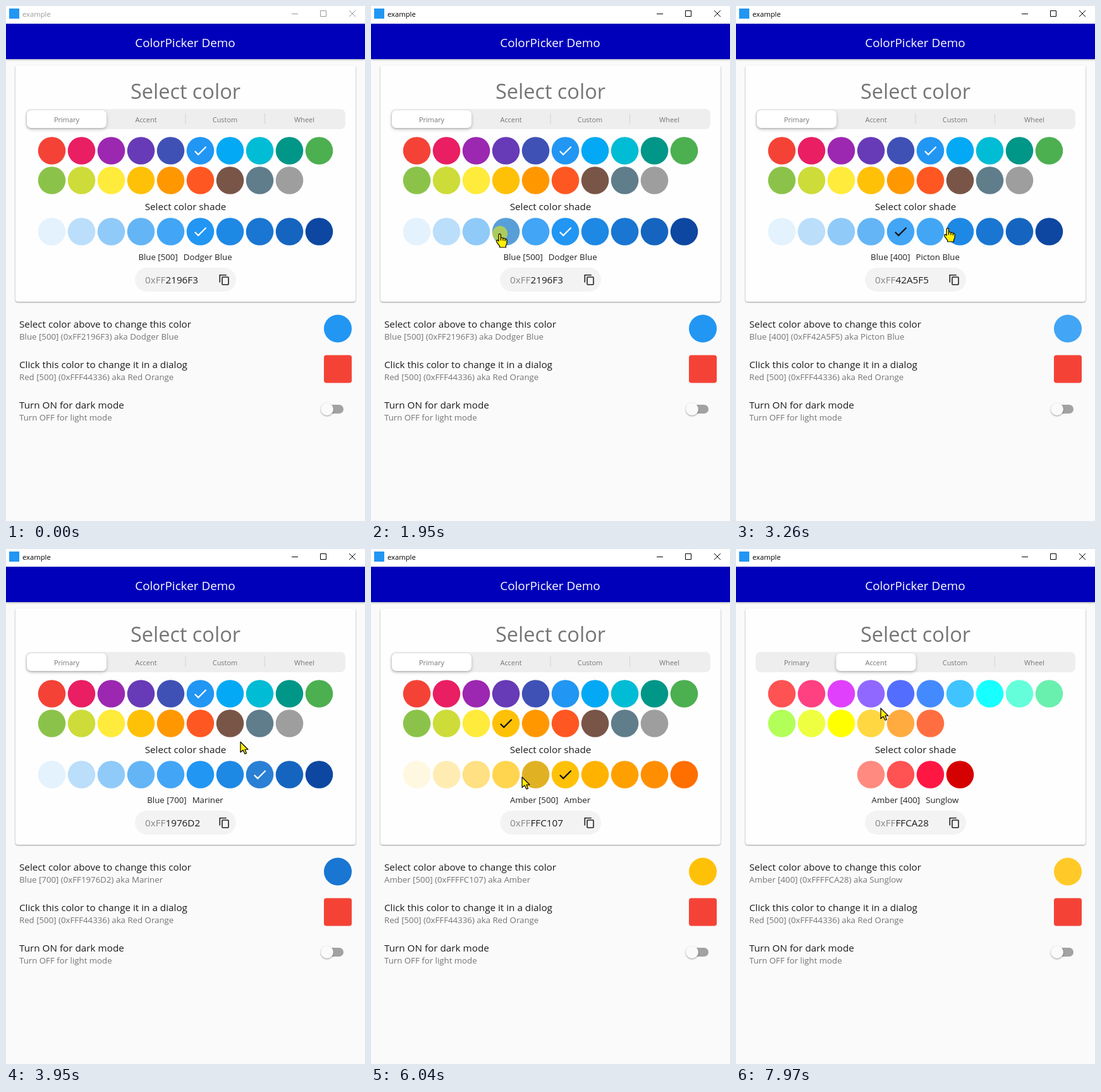
An HTML page that plays this animation: 568x815 px, repeating every 8000 ms.

```html
<!DOCTYPE html>
<html lang="en">
<head>
<meta charset="utf-8">
<title>Color picker</title>
<style>
  html, body { margin: 0; width: 100%; height: 100%; overflow: hidden; background: #fafafa; }
  svg { display: block; width: 568px; height: 815px; font-family: "Open Sans", "Noto Sans", sans-serif; }
  text { white-space: pre; }
  .mid { text-anchor: middle; }
  .head { font-size: 32.5px; fill: #757575; }
  .bar { font-size: 18.9px; fill: #fff; }
  .tab { font-size: 10.95px; fill: #757575; }
  .body { font-size: 15.25px; fill: #1c1c1c; }
  .small { font-size: 13.25px; fill: #757575; }
  .dark { fill: #212121; }
  .faint { fill: #858585; }
  .window { font-size: 11.25px; }
  .card { filter: drop-shadow(0 1.5px 1.2px #0006); }
  .appbar { filter: drop-shadow(0 1px 1.5px #0005); }
  .thumb { filter: drop-shadow(0 2px 2.5px #0004); }
</style>
</head>
<body>
<svg viewBox="0 0 568 815">
  <rect width="568" height="815" fill="#fafafa"/>
  <rect class="appbar" y="28" width="568" height="56" fill="#0000ba"/>
  <rect width="568" height="28" fill="#fff"/>
  <rect x="5" y="4" width="16" height="16" fill="#2196f3"/>
  <g id="chrome">
    <text class="window" x="26" y="17">example</text>
    <path d="M452 12.5h10M497.500 7.500h9v9h-9zM543 7l10 10M553 7l-10 10" fill="none" stroke="currentColor"/>
  </g>
  <text class="bar mid" x="283.500" y="65">ColorPicker Demo</text>

  <rect class="card" x="15" y="94" width="538" height="374" rx="4" fill="#fefefe"/>
  <text class="head mid" x="284" y="147">Select color</text>
  <rect x="31" y="163" width="506" height="32" rx="8" fill="#eee"/>
  <path id="split" d="M284 170v17" stroke="#d4d4d4"/>
  <path d="M409.500 170v17" stroke="#d4d4d4"/>
  <rect id="thumb" class="thumb" x="33" y="165" width="126" height="28" rx="7" fill="#fff"/>
  <g class="tab mid">
    <text x="96" y="184">Primary</text>
    <text x="221.500" y="184">Accent</text>
    <text x="346.500" y="184">Custom</text>
    <text x="472" y="184">Wheel</text>
  </g>
  <g id="dots"></g>
  <text class="body mid" x="284" y="323">Select color shade</text>
  <text class="small dark mid" x="283.500" y="402"><tspan id="shade"></tspan><tspan id="alias" dx="9"></tspan></text>
  <rect x="204" y="414" width="160" height="38" rx="19" fill="#f3f3f3"/>
  <text class="body" x="220" y="439"><tspan class="faint">0xFF</tspan><tspan id="hex"></tspan></text>
  <g fill="none" stroke="#212121" stroke-width="1.6">
    <path d="M338.300 437.500v-11.700h10.500"/>
    <rect x="342" y="429" width="10" height="12" rx="1"/>
  </g>

  <text class="body" x="21" y="509">Select color above to change this color</text>
  <text class="small" id="picked" x="21" y="528"></text>
  <circle id="swatch" cx="525" cy="510.500" r="22"/>
  <text class="body" x="21" y="573">Click this color to change it in a dialog</text>
  <text class="small" x="21" y="592">Red [500] (0xFFF44336) aka Red Orange</text>
  <rect x="503" y="552.500" width="44" height="44" rx="4" fill="#f44336"/>
  <text class="body" x="21" y="637">Turn ON for dark mode</text>
  <text class="small" x="21" y="656">Turn OFF for light mode</text>
  <rect x="504" y="631" width="30" height="14" rx="7" fill="#a2a2a2"/>
  <circle class="card" cx="508" cy="638" r="10" fill="#fafafa"/>

  <g id="cursor">
    <circle id="ring" r="12" fill="#f0ef00" opacity=".55"/>
    <g stroke="#000" stroke-width="1.2" stroke-linejoin="round" fill="#ffee08">
      <path id="arrow" d="M0 0V16.500L4 13L7 19L9.500 18L7 12H12Z"/>
      <path id="hand" d="M-2 2.200C-2 0 1.400 0 1.400 2.200V7.200C2.500 6 4.600 6.400 4.900 8C6 7 8 7.400 8.200 9C9.600 8.200 11 9 11 10.800V15C11 17 9.600 18 9.400 19.200V22H-.4V20.200C-1.600 18-4.200 15.600-5.200 13.200C-6.200 11-4.400 9.600-2.800 11.200L-2 12.200ZM1.400 7V11M4.900 8V11.500M8.200 9V12"/>
    </g>
  </g>
</svg>
<script>
const LOOP = 8000, ENTER = 1090, STEP = 77.3, RING = 300, RADIUS = 21.8;
const $ = id => document.getElementById(id);
const list = s => s.split(' ');

const primary = list('F44336 E91E63 9C27B0 673AB7 3F51B5 2196F3 03A9F4 00BCD4 009688 4CAF50 8BC34A CDDC39 FFEB3B FFC107 FF9800 FF5722 795548 607D8B 9E9E9E');
const accent = list('FF5252 FF4081 E040FB 7C4DFF 536DFE 448AFF 40C4FF 18FFFF 64FFDA 69F0AE B2FF59 EEFF41 FFFF00 FFD740 FFAB40 FF6E40');
const shades = {
  Blue: list('E3F2FD BBDEFB 90CAF9 64B5F6 42A5F5 2196F3 1E88E5 1976D2 1565C0 0D47A1'),
  Amber: list('FFF8E1 FFECB3 FFE082 FFD54F FFCA28 FFC107 FFB300 FFA000 FF8F00 FF6F00'),
  Red: list('FF8A80 FF5252 FF1744 D50000')
};

// Pointer path: time, x, y
const path = [
  [1090, 468, 371], [1330, 370, 345], [1560, 250, 332], [1710, 204, 360],
  [2440, 204, 360], [2720, 258, 360], [3000, 258, 358], [3254, 335, 351],
  [3480, 401, 358], [3830, 401, 358], [4110, 331, 235], [4300, 272, 233],
  [4560, 214, 276], [5440, 214, 276], [5760, 226, 318], [5900, 238.9, 358],
  [6037, 239, 361], [6250, 247, 360], [6500, 247, 360], [6733, 237, 258],
  [7110, 221, 181], [7500, 221, 181], [7970, 229, 252]
];
const presses = [1935, 2750, 3560, 4680, 6250, 7200];
const picks = [
  [0, 'Blue', 500, 'Dodger Blue'], [2095, 'Blue', 300, 'Malibu'],
  [2910, 'Blue', 400, 'Picton Blue'], [3720, 'Blue', 700, 'Mariner'],
  [4800, 'Amber', 500, 'Amber'], [6400, 'Amber', 400, 'Sunglow']
];
const TAB_AT = 7340;

function pointer(t) {
  const i = path.findIndex(p => p[0] > t);
  if (i === 0) return null;
  if (i < 0) return path.at(-1).slice(1);
  const [a, b] = [path[i - 1], path[i]];
  const k = (t - a[0]) / (b[0] - a[0]);
  return [a[1] + (b[1] - a[1]) * k, a[2] + (b[2] - a[2]) * k];
}

const inside = (p, x, y) => p && Math.hypot(p[0] - x, p[1] - y) < RADIUS;

function isDark(hex) {
  const [r, g, b] = [0, 2, 4].map(i => {
    const c = parseInt(hex.substr(i, 2), 16) / 255;
    return c <= 0.03928 ? c / 12.92 : ((c + 0.055) / 1.055) ** 2.4;
  });
  return (0.2126 * r + 0.7152 * g + 0.0722 * b + 0.05) ** 2 <= 0.15;
}

const pool = Array.from({ length: 30 }, () => {
  const g = document.createElementNS('http://www.w3.org/2000/svg', 'g');
  g.innerHTML = `<circle r="${RADIUS}"/><circle r="${RADIUS}"/>
    <path transform="scale(1.1) translate(-12 -12)" d="M9 16.17L4.83 12l-1.42 1.41L9 19 21 7l-1.41-1.41z"/>`;
  $('dots').append(g);
  return g;
});

function layout(isAccent, family) {
  const main = (isAccent ? accent : primary).map((hex, i) =>
    ({ hex, x: 72.5 + 47 * (i % 10), y: i < 10 ? 229 : 276 }));
  const row = shades[isAccent ? 'Red' : family];
  const left = 284 - 23.5 * (row.length - 1);
  return main.concat(row.map((hex, i) => ({ hex, x: left + 47 * i, y: 357 })));
}

const show = (el, on) => el.setAttribute('display', on ? 'inline' : 'none');

function drawDots(dots, t, isAccent, chosen) {
  const recent = [pointer(t - 60), pointer(t - 110)];
  pool.forEach((g, i) => {
    const d = dots[i];
    show(g, d);
    if (!d) return;
    const [disc, veil, tick] = g.children;
    const dark = isDark(d.hex);
    const hover = recent.filter(p => inside(p, d.x, d.y)).length / 2;
    g.setAttribute('transform', `translate(${d.x} ${d.y})`);
    disc.setAttribute('fill', '#' + d.hex);
    veil.setAttribute('fill', dark ? '#fff' : '#000');
    veil.setAttribute('opacity', hover * (dark ? 0.15 : 0.12));
    tick.setAttribute('fill', dark ? '#fff' : '#111');
    show(tick, !isAccent && d.hex === (d.y === 357 ? chosen.hex : chosen.base));
  });
}

function render(now) {
  const time = now % LOOP;
  // The screen refreshes in even steps
  const t = ENTER + STEP * Math.floor((time - ENTER + 12) / STEP);
  const [, family, level, alias] = picks.findLast(p => p[0] <= Math.max(t, 0));
  const hex = shades[family][level / 100];
  const isAccent = t >= TAB_AT;
  const dots = layout(isAccent, family);
  drawDots(dots, t, isAccent, { hex, base: shades[family][5] });

  const label = `${family} [${level}]`;
  $('shade').textContent = label;
  $('alias').textContent = alias;
  $('hex').textContent = hex;
  $('picked').textContent = `${label} (0xFF${hex}) aka ${alias}`;
  $('swatch').setAttribute('fill', '#' + hex);

  const slide = Math.min(1, Math.max(0, (t - TAB_AT) / 320));
  $('thumb').setAttribute('x', 33 + 125.5 * (1 - (1 - slide) ** 3));
  show($('split'), !isAccent);

  const ink = t < 1930 ? '#999' : '#000';
  $('chrome').setAttribute('fill', ink);
  $('chrome').setAttribute('color', ink);

  const p = pointer(t);
  show($('cursor'), p);
  if (p) {
    const onDot = dots.some(d => inside(p, d.x, d.y));
    $('cursor').setAttribute('transform', `translate(${p})`);
    show($('hand'), onDot);
    show($('arrow'), !onDot);
    show($('ring'), presses.some(at => t >= at && t < at + RING));
  }
}

const start = performance.now();
function frame() {
  render(performance.now() - start);
  requestAnimationFrame(frame);
}
frame();
</script>
</body>
</html>
```
